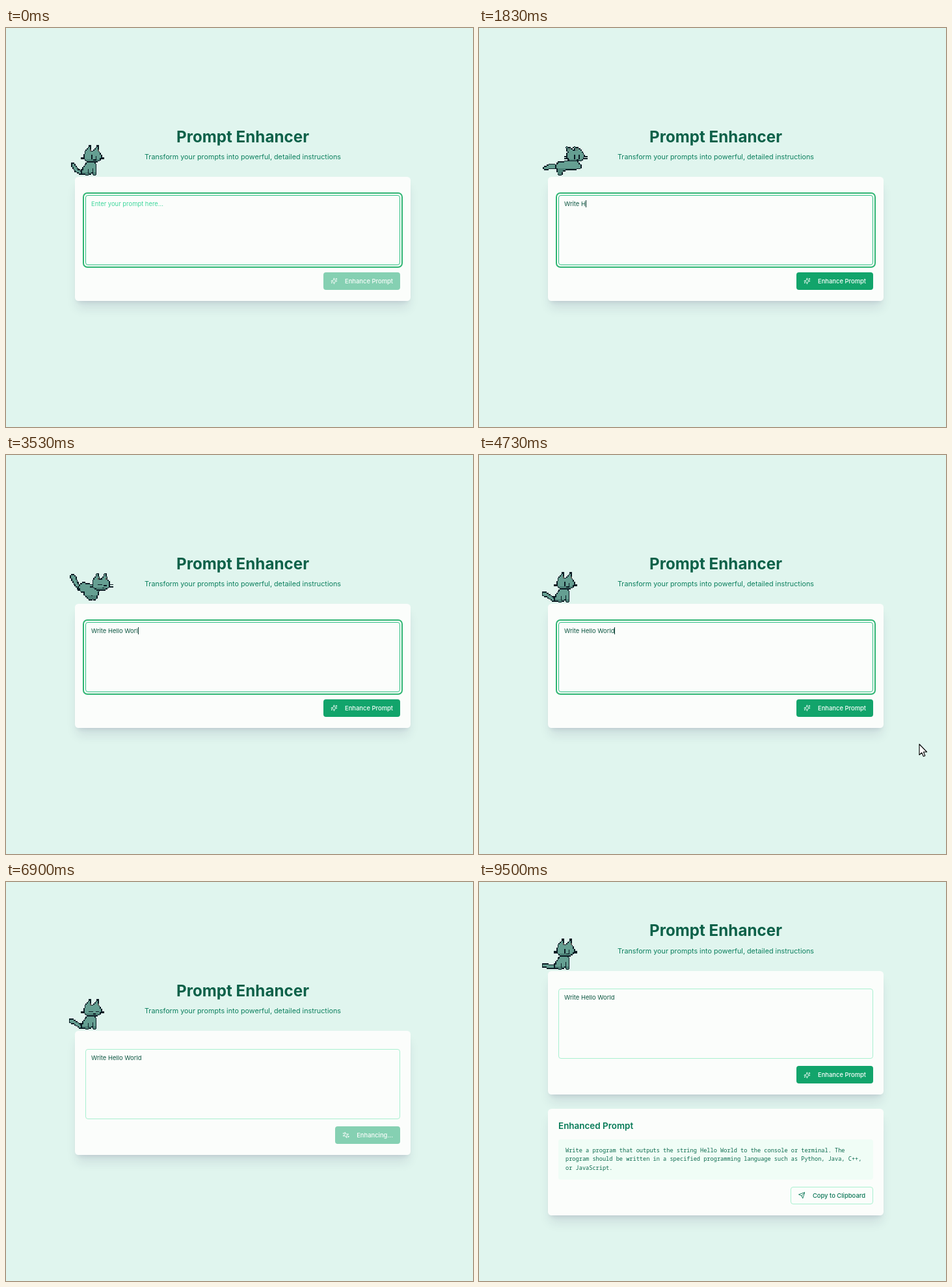
These frames come from a looping animation (718x614 px, 9.56 s). An HTML page with a canvas:

```html
<!DOCTYPE html>
<html lang="en">
<head>
<meta charset="utf-8">
<title>Prompt Enhancer</title>
<style>
  html, body { margin: 0; width: 100%; height: 100%; overflow: hidden; background: #e0f5ee; }
  body { font: 9.41px/14px Inter, sans-serif; }
  #stage { position: absolute; inset: 0; overflow: clip; contain: paint; }
  #page { position: absolute; left: 0; top: 0; width: 718px; height: 560px; }
  #page > *, #result > *, .cursor { position: absolute; box-sizing: border-box; white-space: pre; margin: 0; }
  h1 { left: 10px; top: 150px; width: 708px; text-align: center; font: 700 24.2px/36px Inter, sans-serif; color: #0d6149; }
  .sub { left: 10px; top: 191.2px; width: 708px; text-align: center; font-size: 10.78px; line-height: 16px; color: #0a7f5d; }
  .card {
    left: 106px; width: 516px; border-radius: 5.4px; background: #fbfdfb;
    box-shadow: 0 13.4px 16.8px -3.4px rgba(40, 30, 80, .11), 0 5.4px 6.7px -4px rgba(40, 30, 80, .11);
  }
  #ring { left: 118px; top: 253px; width: 492px; height: 116px; border: 2px solid #2fb573; border-radius: 7px; }
  #area { left: 122px; top: 257px; width: 484px; height: 108px; border: 1px solid; border-radius: 4px; padding: 6px 8px; color: #0b5540; }
  #caret { display: inline-block; width: 1px; height: 11px; margin-right: -1px; vertical-align: -2px; background: #0b3a30; }
  .btn { right: 112px; height: 27px; padding: 0 11px; display: flex; align-items: center; gap: 11.5px; border-radius: 4px; font-weight: 500; color: #fbfffd; }
  .btn svg { width: 10.75px; height: 10.75px; fill: none; stroke: currentColor; stroke-width: 2; stroke-linecap: round; stroke-linejoin: round; }
  #go { top: 376px; }
  #cat { left: 95px; top: 175px; width: 74.8px; height: 54.4px; image-rendering: pixelated; }
  h2 { left: 122px; top: 366px; font: 600 13.44px/19px Inter, sans-serif; color: #067a57; }
  .out {
    left: 122px; top: 396px; width: 484px; height: 62px; padding: 11px; border-radius: 4px; background: #f0fdf6;
    font: 8.63px/13.45px "Noto Sans Mono", "DejaVu Sans Mono", monospace; color: #0b6a4e;
  }
  .copy { top: 469px; border: 1px solid #a9f0d0; color: #0a7656; }
  .cursor { left: 0; top: 0; width: 20px; height: 26px; fill: #fff; stroke: #000; stroke-width: 1.1; stroke-linejoin: round; overflow: visible; }
</style>
</head>
<body>
<div id="stage">
  <div id="page">
    <h1>Prompt Enhancer</h1>
    <p class="sub">Transform your prompts into powerful, detailed instructions</p>
    <div class="card" style="top:229.4px;height:190.6px"></div>
    <div id="ring"></div>
    <div id="area"><span id="text"></span><i id="caret"></i></div>
    <div class="btn" id="go">
      <svg id="spark" viewBox="0 0 24 24"><path d="M9.9 15.5A2 2 0 0 0 8.5 14.1L2.4 12.5a.5.5 0 0 1 0-1L8.5 9.9A2 2 0 0 0 9.9 8.5L11.5 2.4a.5.5 0 0 1 1 0L14.1 8.5A2 2 0 0 0 15.5 9.9L21.6 11.5a.5.5 0 0 1 0 1L15.5 14.1a2 2 0 0 0-1.4 1.4L12.5 21.6a.5.5 0 0 1-1 0ZM20 3v4M22 5h-4M4 17v2M5 18H3"/></svg>
      <span id="label"></span>
    </div>
    <canvas id="cat" width="44" height="32"></canvas>
  </div>
  <div id="result">
    <div class="card" style="top:349px;height:164px"></div>
    <h2>Enhanced Prompt</h2>
    <pre class="out">Write a program that outputs the string Hello World to the console or terminal. The
program should be written in a specified programming language such as Python, Java, C++,
or JavaScript.</pre>
    <div class="btn copy">
      <svg viewBox="0 0 24 24"><path d="m22 2-7 20-4-9-9-4ZM22 2 11 13"/></svg>
      <span>Copy to Clipboard</span>
    </div>
  </div>
  <svg class="cursor" id="arrow"><path d="M0 0V16.5L3.8 13 6.3 18.8 8.8 17.7 6.4 12H11.6Z"/></svg>
  <svg class="cursor" id="hand"><path d="M-1.6 14V2a1.7 1.7 0 0 1 3.4 0V8.4q3-1 3 .9q2.9-.8 2.9 1q2.5-.4 2.5 1.5V16q0 3-1.8 5v2H-.3v-2Q-3.4 18-6 13.6q-.6-2 1.2-2q1.4.3 3.2 2.6M1.8 8.4v3.6M4.8 9.3v3M7.7 10.3v2.4"/></svg>
</div>
<script>
const LOOP = 9560, PROMPT = 'Write Hello World';
const TYPE_AT = 600, KEY_MS = 150, WORD_MS = 320;
const BLUR_AT = 5560, SEND_AT = 5700, DONE_AT = 7800;
const POUNCE_AT = 1530, POUNCE_MS = 500, CAT_MS = 1800, STRIDE_MS = 200;

const $ = id => document.getElementById(id);
const clamp = v => Math.max(0, Math.min(1, v));
const mix = (a, b, u) => a + (b - a) * u;
const mixRow = (a, b, u) => a.map((v, i) => mix(v, b[i], u));
const ease = u => u * u * (3 - 2 * u);
const show = (el, on) => { el.style.visibility = on ? 'visible' : 'hidden'; };

// Each word starts after an extra pause
let word = 0;
const keyTimes = [...PROMPT].map((c, i) => {
  if (i && PROMPT[i - 1] === ' ') word++;
  return TYPE_AT + i * KEY_MS + word * WORD_MS;
});

// Poses: rows of x, y, radius for tail, body, hind leg, front leg; last row is head x, y, ear lean
const SIT = [
  [115, 223, 2], [108, 219, 2], [103, 211, 2],
  [130, 211, 6], [126, 218, 7.3],
  [121, 221, 4], [125, 224, 2],
  [134, 212, 3.5], [135.5, 223.5, 2.3],
  [133, 198, 2]
];
const LEAP = [
  [118, 214, 2.3], [110, 213, 2.3], [103, 216, 2.3],
  [125, 213, 6], [147, 211, 6.2],
  [125, 216, 5], [124.5, 223, 3.2],
  [149, 212, 3], [154, 213.5, 2.6],
  [148, 197, -4]
];
const TUCK = [
  [113, 205, 2.3], [107, 197, 2.3], [103, 188, 3],
  [119, 204, 6.5], [134, 209, 8],
  [124, 212, 4], [130, 220, 3],
  [138, 212, 3], [136, 219, 3],
  [146, 199, 1]
];
// Seated tail: time in the cycle, joint, tip
const WAG = [
  [500, 108, 219, 103, 211],
  [640, 108, 219, 103, 211],
  [770, 107, 222, 99.5, 221],
  [1070, 106.5, 218, 104.5, 211.5],
  [1300, 107, 217, 99.5, 214]
];

const CELL = 1.7, INK = '#0c1c24', FUR = '#659f92', SHADE = '#4d8278', EAR = '#5f5a55';
const g = $('cat').getContext('2d');

// Signed distance to a tapered capsule
function taper(x, y, a, b) {
  const dx = b[0] - a[0], dy = b[1] - a[1];
  const u = clamp(((x - a[0]) * dx + (y - a[1]) * dy) / (dx * dx + dy * dy));
  return Math.hypot(x - a[0] - dx * u, y - a[1] - dy * u) - mix(a[2], b[2], u);
}

function paint(segs, shadeY) {
  for (let j = 0; j < 32; j++) for (let i = 0; i < 44; i++) {
    const x = 95 + (i + .5) * CELL, y = 175 + (j + .5) * CELL;
    const d = Math.min(...segs.map(s => taper(x, y, s[0], s[1])));
    if (d > CELL * .95 || y > 227.5) continue;
    g.fillStyle = d > 0 || y > 225.8 ? INK : y > shadeY ? SHADE : FUR;
    g.fillRect(i, j, 1, 1);
  }
}

function mark(x, y, w, h, color = INK) {
  g.fillStyle = color;
  g.fillRect(Math.round((x - 95) / CELL), Math.round((y - 175) / CELL), w, h);
}

function drawCat(p, closed, seated) {
  g.clearRect(0, 0, 44, 32);
  paint([[p[0], p[1]], [p[1], p[2]]], 999);
  paint([[p[3], p[4]], [p[5], p[6]], [p[7], p[8]]], seated ? 222 : 216);
  if (seated) {
    mark(126, 217, 1, 4);
    mark(132, 216, 1, 6);
  }
  const [x, y, lean] = p[9];
  const tipY = y - 15 + Math.max(0, -lean) * .6;
  const ear = ox => [[x + ox, y - 6.5, 4.2], [x + ox + lean * 1.5, tipY, .7]];
  paint([[[x - 5, y, 7.6], [x + 5, y, 7.6]], ear(-7), ear(5)], y + 5);
  mark(x - 6 + lean, y - 11, 1, 2, EAR);
  mark(x + 6 + lean, y - 11, 1, 2, EAR);
  if (closed) {
    mark(x - 5, y, 4, 1);
    mark(x + 4, y + 1, 3, 1);
  } else {
    mark(x - 2, y - 2, 1, 4);
    mark(x + 5, y - 1, 1, 4);
  }
  mark(x + 1, y + 5, 2, 1);
  for (const dy of [0, 3]) {
    mark(x - 17, y + dy, 3, 1);
    mark(x + 13, y + dy, 3, 1);
  }
}

function cat(t) {
  const since = t - POUNCE_AT;
  const phase = since < 0 ? Math.max(POUNCE_MS, since + CAT_MS) : since % CAT_MS;
  if (phase < POUNCE_MS) {
    const stretch = .5 - .5 * Math.cos(phase / STRIDE_MS * 2 * Math.PI);
    drawCat(TUCK.map((row, i) => mixRow(row, LEAP[i], stretch)), stretch < .4, false);
    return;
  }
  const k = Math.min(WAG.length - 2, WAG.findLastIndex(w => w[0] <= phase));
  const [a, b] = [WAG[k], WAG[k + 1]];
  const [, jx, jy, tx, ty] = mixRow(a, b, clamp((phase - a[0]) / (b[0] - a[0])));
  const pose = SIT.slice();
  pose[1] = [jx, jy, 2];
  pose[2] = [tx, ty, 2];
  drawCat(pose, phase > 1550, true);
}

function pointer(t) {
  const arrive = ease(clamp((t - 4600) / 750));
  const leave = clamp((t - 6000) / 500) ** 2;
  const x = mix(mix(690, 535, arrive), 726, leave);
  const y = mix(mix(450, 394, arrive), 472, leave);
  const on = t >= 4600 && t < 6500;
  const over = on && t < SEND_AT && x > 488 && x < 606 && y > 376 && y < 403;
  for (const id of ['arrow', 'hand']) {
    $(id).style.transform = `translate(${Math.round(x)}px, ${Math.round(y)}px)`;
    show($(id), on && over === (id === 'hand'));
  }
  return over;
}

function setText(el, s) {
  if (el.textContent !== s) el.textContent = s;
}

function frame() {
  const t = performance.now() % LOOP;
  const count = keyTimes.filter(k => k <= t).length;
  const focused = t < BLUR_AT, busy = t >= SEND_AT && t < DONE_AT, done = t >= DONE_AT;

  setText($('text'), count ? PROMPT.slice(0, count) : 'Enter your prompt here...');
  $('text').style.color = count ? '' : '#3fd79c';
  const blink = count && Math.floor((t - keyTimes[count - 1]) / 500) % 2 === 0;
  show($('caret'), focused && blink);
  show($('ring'), focused);
  const border = mixRow([45, 190, 130], [169, 240, 208], clamp((t - BLUR_AT) / 150));
  $('area').style.borderColor = `rgb(${border.map(Math.round)})`;

  const over = pointer(t);
  $('go').style.opacity = busy || !count ? .5 : 1;
  $('go').style.background = over ? '#0b855c' : '#12a46b';
  setText($('label'), busy ? 'Enhancing...' : 'Enhance Prompt');
  $('spark').style.transform = busy ? `rotate(${(t - SEND_AT) * .36}deg)` : '';

  $('page').style.top = done ? '-92.6px' : '0';
  show($('result'), done);
  cat(t);
  requestAnimationFrame(frame);
}
frame();
</script>
</body>
</html>
```
